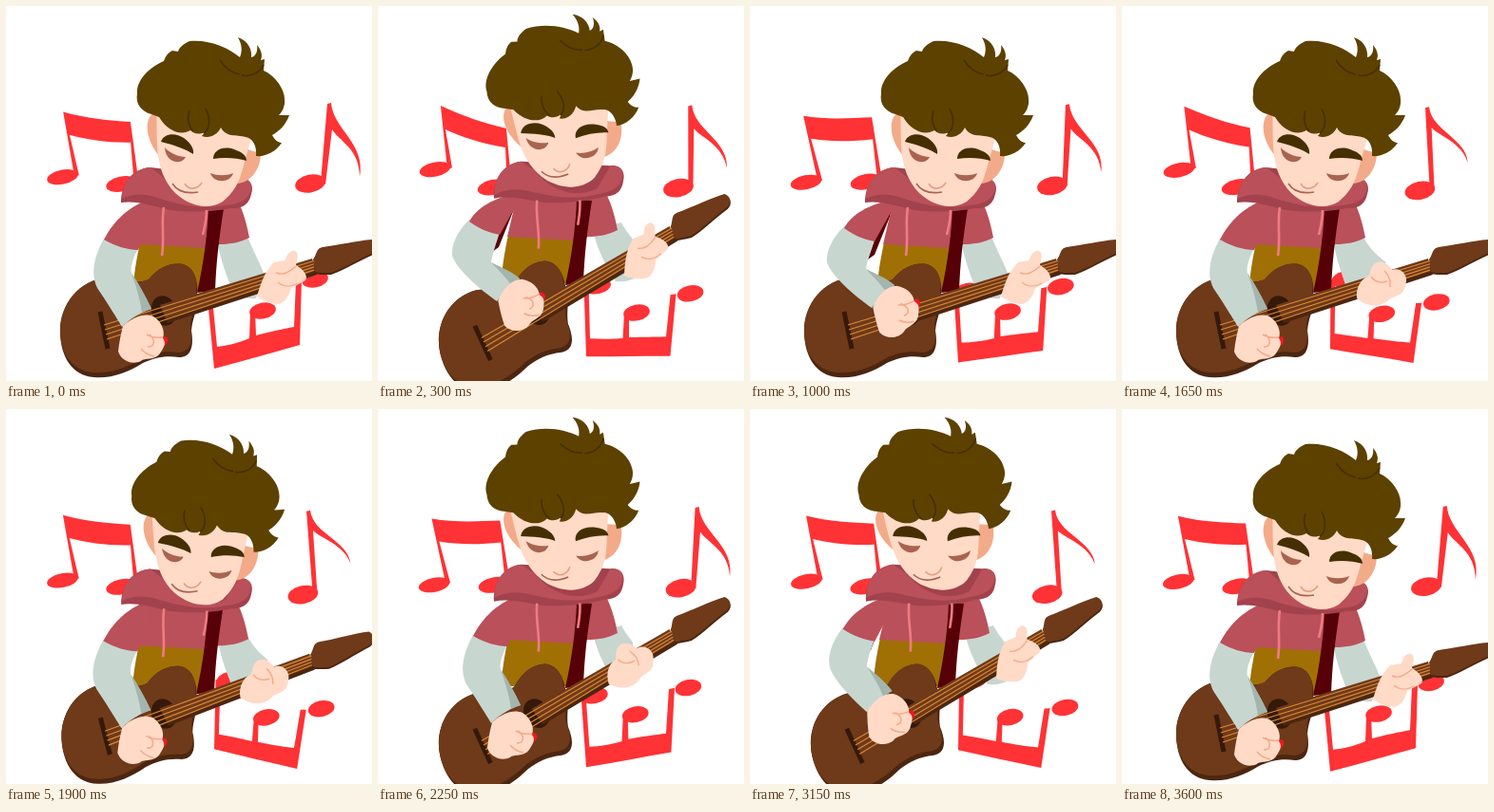
An HTML page with a canvas that plays this animation: 385 by 395 pixels, repeating every 3650 ms.

```html
<!DOCTYPE html>
<html>
<head>
<meta charset="utf-8">
<style>
html, body { margin: 0; overflow: hidden; background: #fff; }
canvas { display: block; }
</style>
</head>
<body>
<canvas id="stage" width="385" height="395"></canvas>
<script>
const ctx = document.getElementById('stage').getContext('2d');
const LOOP = 3650, STEP = 50, SWAY = LOOP / 3, BAR = 2806, BEAT = BAR / 4;
const RED = '#ff3235', HAIR = '#5d4100', HAIR_DARK = '#452f00', SKIN = '#ffdac7', BLUSH = '#f3aa88',
  LID = '#a8644f', PINK = '#ba5059', PINK_DARK = '#a2424c', CORD = '#ee7c84', MUSTARD = '#a07005',
  GREY = '#c8d6d0', GREY_DARK = '#a3b5ad', STRAP = '#560007', WOOD = '#6e3a1a', WOOD_DARK = '#4c2610',
  HOLE = '#35190a', STRING = '#dc8730', PICK = '#f31620';

const mod = (a, n) => (a % n + n) % n;
const lerp = (a, b, k) => a + (b - a) * k;
const ease = (from, to, t) => {
  const u = Math.min(1, Math.max(0, (t - from) / (to - from)));
  return u * u * (3 - 2 * u);
};
const wave = (t, peak) => (1 + Math.cos((t - peak) / SWAY * 2 * Math.PI)) / 2;

// Blends two paths that share the same commands
function mix(a, b, k) {
  const ends = b.match(/-?[\d.]+/g);
  let i = 0;
  return a.replace(/-?[\d.]+/g, n => lerp(+n, +ends[i++], k).toFixed(2));
}
function fill(color, path) {
  ctx.fillStyle = color;
  ctx.fill(new Path2D(path));
}
function line(color, width, path) {
  ctx.strokeStyle = color;
  ctx.lineWidth = width;
  ctx.stroke(new Path2D(path));
}
function oval(color, x, y, rx, ry, turn) {
  ctx.fillStyle = color;
  ctx.beginPath();
  ctx.ellipse(x, y, rx, ry, turn, 0, 7);
  ctx.fill();
}
// Draws with a shift and a turn about the pivot (px, py)
function group(dx, dy, degrees, px, py, draw) {
  ctx.save();
  ctx.translate(px + dx, py + dy);
  ctx.rotate(degrees * Math.PI / 180);
  ctx.translate(-px, -py);
  draw();
  ctx.restore();
}

function drawNotes(t) {
  const left = wave(t, 945 + SWAY / 2), right = wave(t, -8);
  const head = (x0, y0, x1, y1, k, rx, ry) =>
    oval(RED, lerp(x0, x1, k), lerp(y0, y1, k), rx, ry, -0.2);

  fill(RED, mix(
    'M56 116 C80 120 105 118 128 117 L139 184 L134 184 L129 140 C106 143 82 143 64 140 L76 184 L71 184Z',
    'M66 105 C90 116 112 124 135 129 L141 193 L136 193 L134 149 C112 146 88 138 71 130 L78 170 L73 172Z', left));
  head(59, 186, 60, 172, left, 16.5, 7.5);
  head(122, 185, 121, 191, left, 16.5, 8);

  fill(RED, mix(
    'M315 108 L319 107 C322 132 359 138 362 162 C354 142 330 136 322 128 L327 194 L322 192Z',
    'M338 103 L342 102 C344 130 379 145 372 180 C372 150 350 142 343 130 L336 188 L331 186Z', right));
  head(312, 196, 320, 187, right, 16, 9.5);

  fill(RED, mix(
    'M221 284 L226 284 L224 342 C235 344 248 347 259 350 L261 326 L266 326 L265 351 C278 354 292 357 303 358 L310 318 L316 318 L306 380 C276 372 248 365 219 357Z',
    'M212 308 L217 308 L222 359 C232 358 245 355 256 350 L257 322 L262 322 L263 347 C278 343 292 340 303 338 L305 290 L311 288 L309 357 C280 365 250 374 219 382Z', right));
  head(236, 284, 226, 306, right, 14, 8.5);
  head(274, 325, 270, 321, right, 14, 8.5);
  head(332, 317, 325, 288, right, 14, 8.5);
}

function drawFretSleeve(lean, closed) {
  const upright = mix(
    'M222 248 L254 243 C260 258 268 272 272 284 C268 296 264 302 263 308 C255 309 248 306 240 304 C232 285 226 268 222 248Z',
    'M222 248 L254 243 C260 256 270 264 278 270 C266 280 252 290 249 303 C246 304 242 304 238 302 C232 285 226 268 222 248Z', closed);
  fill(GREY, mix(upright,
    'M226 236 L256 228 C260 236 264 240 268 246 C268 262 264 274 276 282 C268 290 258 291 250 290 C240 275 230 255 226 236Z', lean));
}

function drawTorso() {
  fill(STRAP, 'M151 206 L147 222 L131 262 L124 267 C130 250 136 232 142 212Z');
  fill(MUSTARD, 'M141 249 L222 249 L216 300 L134 300 C134 285 137 268 141 249Z');
  fill(PINK, 'M152 200 L240 200 C248 210 253 228 256 244 C246 249 236 251 225 251 L210 255 L140 251Z');
  fill(STRAP, 'M213 212 L229 213 C224 245 221 270 220 300 L201 302 C208 270 212 240 213 212Z');
}

function drawHood() {
  fill(PINK_DARK, 'M121 207 C121 190 130 172 152 170 L246 181 C257 181 261 189 258 198 C256 208 250 214 236 213 C220 217 190 218 168 214 C150 209 135 205 121 207Z');
  fill(PINK, 'M122 203 C122 188 132 171 152 170 L165 180 C180 202 205 214 230 204 L245 182 C256 181 260 187 257 195 C254 205 244 209 230 210 C205 215 182 209 162 203 C146 197 132 198 122 203Z');
  line(CORD, 2.6, 'M166 212 C163 230 167 245 164 263');
  line(CORD, 2.6, 'M211 215 C211 226 209 232 207 241');
}

function drawHead() {
  fill(BLUSH, 'M156 112 C145 118 146 140 161 158 L166 120Z');
  fill(BLUSH, 'M250 148 C256 154 266 152 268 157 C267 172 258 186 243 187Z');
  fill(SKIN, 'M158 108 C160 140 154 172 178 197 C192 210 212 216 228 206 C242 194 246 184 251 164 L262 126 L200 92Z');
  fill(HAIR, 'M153 114 C142 111 136 103 138 92 C137 80 148 66 166 58 C168 52 171 49 175 47 L181 48 C182 44 186 40 193 37 ' +
    'C214 35 234 44 246 54 C249 47 248 40 244 33 C255 37 259 46 258 54 C263 53 265 47 264 41 C269 47 270 52 268 57 L272 56 L271 68 ' +
    'C284 74 293 88 293 98 C294 106 290 112 287 115 L298 115 C294 126 287 132 280 136 C283 142 287 144 290 144 C284 154 272 159 263 158 ' +
    'C264 148 260 139 252 138 C242 135 232 139 226 128 C222 136 214 140 206 137 L209 133 C202 136 197 134 194 131 ' +
    'C184 137 170 132 161 117Z');
  line(HAIR_DARK, 1.6, 'M225 57 C231 66 239 71 246 72 M248 73 C258 75 267 70 271 62 M193 110 C190 120 193 128 197 132 M210 108 C216 120 214 130 208 134');

  fill(HAIR_DARK, 'M163 143 C166 134 178 133 187 139 C194 144 198 150 197 156 C190 151 175 146 163 143Z');
  fill(HAIR_DARK, 'M218 161 C218 152 228 147 240 151 C248 154 253 157 253 163 C243 160 230 159 218 161Z');
  fill(LID, 'M167 149 C172 155 182 159 189 159 C185 168 168 166 167 149Z');
  fill(LID, 'M215 176 C222 179 232 179 239 176 C236 187 218 187 215 176Z');
  line('#e59f82', 1.6, 'M188 187 C192 194 201 194 206 186');
  line(LID, 1.6, 'M175 187 C180 195 190 198 202 196');
}

function drawGuitar() {
  const body = 'M57 342 C57 315 76 288 108 286 C124 287 138 294 150 288 C160 276 172 270 186 272 C198 275 203 290 201 306 C204 314 196 328 195 342 C198 360 194 370 182 370 C166 368 156 371 144 376 C128 386 110 393 92 391 C70 389 57 370 57 342Z';
  fill(WOOD_DARK, body);
  ctx.save();
  ctx.clip(new Path2D(body));
  ctx.translate(-1, -5);
  fill(WOOD, body);
  ctx.restore();
  oval(HOLE, 166, 321, 13, 16, -0.3);
  fill(WOOD_DARK, 'M164 318 L322 268 L327 283 L198 325 L170 334Z');
  fill(WOOD, 'M162 315 L322 266 L326 279 L168 329Z');
  const headstock = 'M323 267 C327 262 326 255 333 254 C350 252 370 247 386 246 C392 250 392 256 386 260 C370 267 356 276 342 281 C334 281 328 281 325 280Z';
  group(0, 2, 0, 0, 0, () => fill(WOOD_DARK, headstock));
  fill(WOOD, headstock);
  line(HOLE, 5, 'M99 322 L107 361');
  for (let i = 0; i < 4; i++) line(STRING, 1.2, `M${103 + i} ${336 + 5 * i} L324 ${268.5 + 3.2 * i}`);
}

function drawFretHand(closed) {
  fill(SKIN, mix(
    'M264 306 C268 292 272 280 282 270 L294 268 C295 262 299 257 304 258 C309 260 306 268 305 273 C314 278 318 285 315 289 C308 293 302 296 300 297 C298 306 292 314 285 314 C277 313 270 310 264 306Z',
    'M247 308 C246 298 250 288 260 284 L261 280 C263 273 267 268 274 270 C279 271 282 275 284 278 C292 275 300 282 299 290 C298 297 296 302 292 304 C288 306 285 307 282 308 C274 317 260 319 247 308Z', closed));
  line(BLUSH, 1.4, mix(
    'M284 281 C291 284 297 281 305 274 M286 291 C292 296 300 296 307 292',
    'M262 285 C266 291 273 292 279 290 M276 279 C281 284 283 289 282 296', closed));
}

function drawStrumArm(up) {
  fill(GREY, mix(
    'M103 245 C92 265 88 285 98 300 C108 315 116 328 122 338 C130 330 142 322 153 319 C146 305 138 290 132 282 C130 272 136 262 139 255Z',
    'M99 232 C86 245 80 258 81 270 C86 285 110 305 128 318 C134 310 144 300 152 294 C142 286 130 282 122 277 C124 265 128 256 131 245Z', up));
  fill(GREY_DARK, mix(
    'M132 281 C139 292 147 305 153 319 C149 320 146 322 143 323 C141 308 136 293 132 281Z',
    'M122 277 C132 282 144 287 152 294 C149 297 146 299 144 302 C138 294 130 285 122 277Z', up));
  fill(PINK, mix(
    'M152 203 C124 213 111 231 103 246 C115 253 128 257 139 257 L152 228Z',
    'M152 203 C124 210 108 218 99 234 C108 241 120 246 131 248 L150 214Z', up));
  group(10 * up, -29 * up, -25 * up, 142, 350, () => {
    oval(PICK, 166, 353, 4, 5, 0.5);
    fill(SKIN, 'M123 337 C134 327 146 323 155 327 C163 332 168 342 165 350 C170 356 164 362 162 366 C156 374 146 370 142 374 C134 378 122 375 118 364 C119 354 121 345 123 337Z');
    line(BLUSH, 1.5, 'M148 346 C153 349 158 350 165 349 M151 346 C158 353 156 359 149 359 M142 361 C146 366 151 368 156 369');
  });
}

function draw(t) {
  // The song restarts one step after the notes do
  const song = mod(t - STEP, LOOP) + STEP - 525;
  const bar = mod(song - 100, BAR) + 100;
  const beat = mod(bar, BEAT);
  const lean = ease(1328, 1478, bar) - ease(2731, 2881, bar);
  const closed = ease(750, 850, bar) - ease(2050, 2150, bar);
  const up = ease(425, 475, beat) - ease(490, 560, beat);

  ctx.clearRect(0, 0, 385, 395);
  drawNotes(t);
  drawFretSleeve(lean, closed);
  group(-4 * lean, -8 * lean, 0, 0, 0, drawTorso);
  group(0, 0, -13 * lean, 165, 317, () => {
    drawGuitar();
    drawFretHand(closed);
  });
  group(-3 * lean, -7 * lean, 0, 0, 0, () => drawStrumArm(up));
  group(0, -9 * lean, -4 * lean, 190, 195, drawHood);
  group(-12.5 * lean, -19 * lean, -13 * lean, 207, 149, drawHead);
}

const start = performance.now();
function tick() {
  const t = (performance.now() - start) % LOOP;
  draw(Math.floor(t / STEP) * STEP);
  requestAnimationFrame(tick);
}
tick();
</script>
</body>
</html>
```
